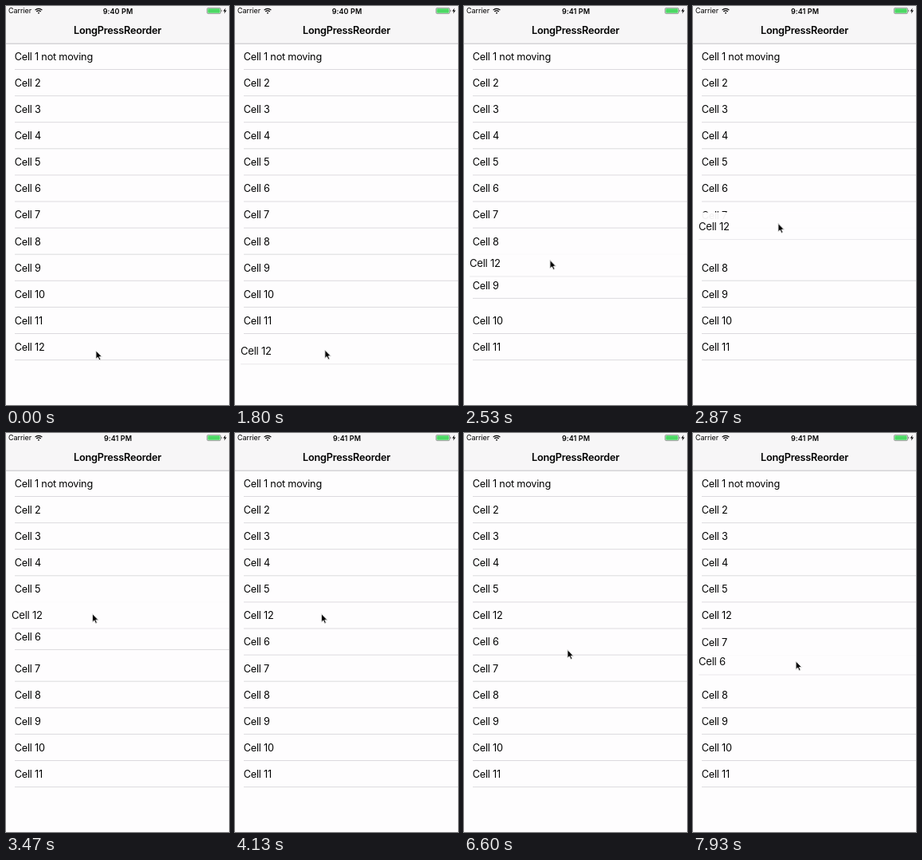
An HTML page for the animation above (8 s loop, 280 px wide and 500 px high).

```html
<!DOCTYPE html>
<html lang="en">
<head>
<meta charset="utf-8">
<title>LongPressReorder</title>
<style>
  html, body { margin: 0; height: 100%; overflow: hidden; background: #fefdfe; }
  svg { display: block; font-family: Inter, Roboto, sans-serif; }
  .cell text, .title { font-size: 12.7px; letter-spacing: -.22px; }
  .title { font-weight: 600; text-anchor: middle; }
  .status { font-size: 9px; letter-spacing: -.05px; }
  #clock { font-weight: 600; text-anchor: middle; letter-spacing: .1px; }
  .cell line { stroke: #d3d2d6; stroke-width: .8; }
  .cell rect { fill: #fefdfe; }
  .cell rect ~ line { stroke: #e4e3e7; }
</style>
</head>
<body>
<svg width="280" height="500" viewBox="0 0 280 500">
  <rect width="280" height="47" fill="#f7f6f7"/>
  <path d="M0 47.2H280" stroke="#b4b3b6" stroke-width=".8"/>
  <text class="status" x="3" y="9.3">Carrier</text>
  <g fill="none" stroke="#000" stroke-width="1.2">
    <path d="M36.6 5.2a6.2 6.2 0 0 1 8.8 0M38.3 7a3.8 3.8 0 0 1 5.4 0"/>
    <path d="M41 9.9L39.8 8.6a1.7 1.7 0 0 1 2.4 0Z" fill="#000" stroke="none"/>
  </g>
  <text class="status" id="clock" x="140.5" y="9.5"></text>
  <rect x="252.4" y="2.4" width="17.2" height="7.2" rx="1.6" fill="none" stroke="#666" stroke-width=".6"/>
  <rect x="253.3" y="3.3" width="15.4" height="5.4" rx=".8" fill="#4cd964"/>
  <path d="M270.4 4.7q1 .2 1 1.3t-1 1.3Z" fill="#666"/>
  <path d="M275.6 2.4L272.8 6.5H274.7L274 9.6L277 5.4H275Z"/>
  <text class="title" x="140" y="35">LongPressReorder</text>
  <g id="list"></g>
  <path id="cursor" d="M0 0V10.2L2.4 8.1L4.1 11.8L5.8 11L4.2 7.5H7.3Z" stroke="#fff" stroke-width=".8"
        style="filter:drop-shadow(0 .7px .6px #0005)"/>
</svg>
<script>
const LOOP = 8000, ROW = 33.1, FIRST = 63, SCALE = 1.03;
const LAG = 25, LIFT = 160, SLIDE = 270;
const $ = id => document.getElementById(id);
const clamp = v => Math.min(1, Math.max(0, v));
const ease = v => (1 - Math.cos(Math.PI * clamp(v))) / 2;
const mix = (a, b, k) => a + (b - a) * k;

// Pointer strokes: start, end, target x, target y, acceleration
const strokes = [
  [1750, 2220, 109, 361, 2], [2220, 2867, 107, 272.7], [2867, 3460, 108.5, 226.7, 1.2],
  [4610, 5130, 125.7, 261.7], [5940, 6270, 130, 276], [6410, 6600, 130, 271.7],
  [7500, 7850, 129.2, 286]
];
const pointer = t => strokes.reduce(([x, y], [from, to, x1, y1, power = 1]) => {
  const k = clamp((t - from) / (to - from)) ** power;
  return [mix(x, x1, k), mix(y, y1, k)];
}, [113, 432]);
const heldY = t => pointer(t - LAG)[1];

function makeCell(n, backed) {
  const g = document.createElementNS("http://www.w3.org/2000/svg", "g");
  g.setAttribute("class", "cell");
  g.innerHTML = (backed ? `<rect y="-16.5" width="280" height="33"/>` : "") +
    `<text x="10.8" y="4.8">Cell ${n}${n === 1 ? " not moving" : ""}</text>` +
    `<line x1="11" x2="280" y1="16.5" y2="16.5"/>`;
  $("list").append(g);
  return g;
}

const cells = Array.from({ length: 12 }, (_, i) =>
  ({ slot: i, first: i, moves: [], node: makeCell(i + 1) }));

const drags = [[12, 1040, 3945], [6, 7410, LOOP]].map(([n, up, down]) =>
  ({ cell: cells[n - 1], up, down, node: makeCell(n, true) }));

function shift(cell, by, at) {
  cell.slot += by;
  cell.moves.push([at, by]);
}

// A held cell trades places with each row it is dragged onto
for (const { cell, up, down } of drags) {
  for (let t = up + LIFT; t < down; t++) {
    const by = Math.round((heldY(t) - FIRST) / ROW) - cell.slot;
    if (!by) continue;
    shift(cells.find(c => c.slot === cell.slot + by), -by, t);
    shift(cell, by, t);
  }
}

const cellY = (cell, t) => FIRST + ROW * cell.moves.reduce(
  (slot, [at, by]) => slot + by * ease((t - at) / SLIDE), cell.first);

function place(node, y, scale, opacity) {
  node.setAttribute("transform", `translate(${140 - 140 * scale} ${y}) scale(${scale})`);
  node.setAttribute("opacity", opacity);
}

function draw(now) {
  const t = now % LOOP;
  for (const cell of cells) place(cell.node, cellY(cell, t), 1, 1);
  for (const { cell, up, down, node } of drags) {
    const k = ease((t - up) / LIFT) - ease((t - down) / LIFT);
    const y = cellY(cell, t);
    place(cell.node, y, 1, 1 - k);
    place(node, mix(y, heldY(t), k), mix(1, SCALE, k), .95 * k);
  }
  $("cursor").setAttribute("transform", `translate(${pointer(t)})`);
  $("clock").textContent = t < 2430 ? "9:40 PM" : "9:41 PM";
  requestAnimationFrame(draw);
}
requestAnimationFrame(draw);
</script>
</body>
</html>
```
